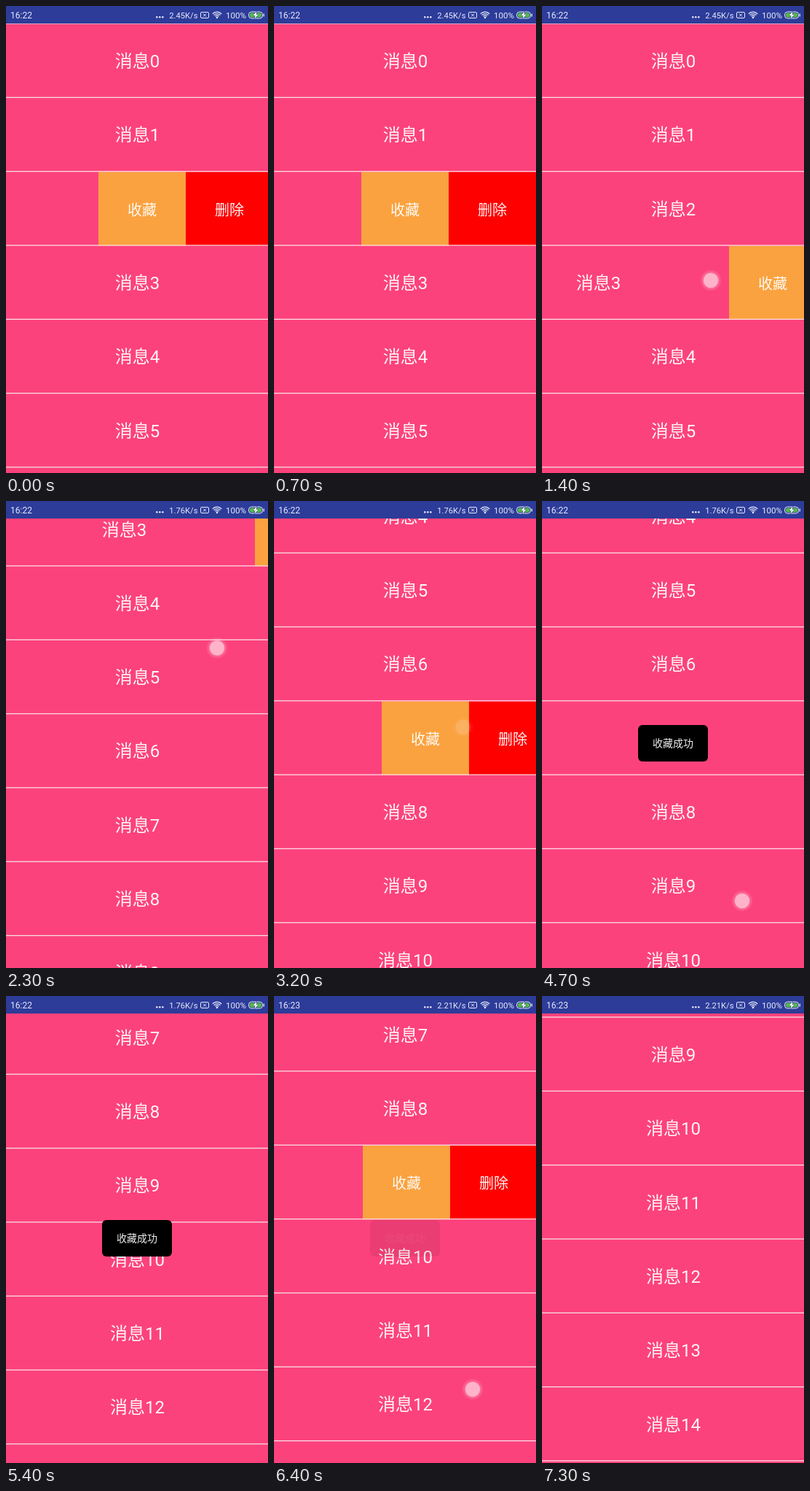
Write an HTML page with a canvas that moves like this. It is 360 by 640 pixels and loops after 7400 ms.

```html
<!DOCTYPE html>
<html lang="zh-CN">
<head>
<meta charset="utf-8">
<title>消息</title>
<style>
  html, body { margin: 0; width: 100%; height: 100%; overflow: hidden; background: #fc427c; }
  canvas { display: block; width: 360px; height: 640px; }
</style>
</head>
<body>
<canvas id="stage" width="360" height="640"></canvas>
<script>
const ctx = document.getElementById('stage').getContext('2d');
const LOOP = 7400, STEP = 100;
const BAR = 24, PITCH = 101.33, BUTTON = 120, DRAG = 103;
const FONT = 'Roboto, "Noto Sans CJK SC", "Noto Sans CJK", sans-serif';
const PINK = '#fc427c', ORANGE = '#faa23f', RED = '#fe0000', LINE = '#f8dce6';
const NAVY = '#2d3c99', INK = '#e6e9fa', WHITE = 'rgba(255,255,255,.94)';

// A row is dragged until release, springs open, and shuts again at close.
const swipes = [
  { row: 2, release: -252, close: 900, x: 240, y: 275 },
  { row: 3, release: 1400, close: 2070, x: 232, y: 376 },
  { row: 7, release: 3036, close: 4000, x: 260, y: 310 },
  { row: 9, release: 6100, close: 6500, x: 245, y: 256 }
];
// The finger lands at x, y and the list follows it, gliding on after release.
const flicks = [
  { start: 2010, span: 800, distance: 459.5, x: 290, y: 542, release: 2320 },
  { start: 4800, span: 800, distance: 272.2, x: 275, y: 548, release: 5050 },
  { start: 6500, span: 600, distance: 175.3, x: 273, y: 539, release: 7060 }
];
const tap = { press: 3820, release: 3940, x: 185, y: 325 };

const progress = (t, start, span) => Math.max(0, Math.min(1, (t - start) / span));
const easeOut = p => 1 - (1 - p) ** 3;

const dragged = (swipe, t) => DRAG * progress(t, swipe.release - 300, 300);
const flicked = (flick, t) => flick.distance * easeOut(progress(t, flick.start, flick.span));

function rowOffset(row, t) {
  const swipe = swipes.find(s => s.row === row);
  if (!swipe) return 0;
  const opened = dragged(swipe, t) +
    (2 * BUTTON - DRAG) * easeOut(progress(t, swipe.release, 400));
  return opened * (1 - easeOut(progress(t, swipe.close, 400)));
}

function rect(x, y, w, h, color) {
  ctx.fillStyle = color;
  ctx.fillRect(x, y, w, h);
}

function pill(x, y, w, h, r, color) {
  ctx.fillStyle = color;
  ctx.beginPath();
  ctx.roundRect(x, y, w, h, r);
  ctx.fill();
}

function disc(x, y, r, color) {
  ctx.fillStyle = color;
  ctx.beginPath();
  ctx.arc(x, y, r, 0, Math.PI * 2);
  ctx.fill();
}

function text(str, x, baseline, size, align = 'center', color = WHITE) {
  ctx.font = `${size}px ${FONT}`;
  ctx.textAlign = align;
  ctx.fillStyle = color;
  ctx.fillText(str, x, baseline);
}

function drawRow(i, scroll, t) {
  const top = BAR + 0.67 + i * PITCH - scroll;
  const edge = Math.round(360 - rowOffset(i, t));
  text('消息' + i, edge - 179.5, top + 59.3, 24);
  if (edge < 360) {
    [['收藏', ORANGE], ['删除', RED]].forEach(([label, color], n) => {
      const x = edge + n * BUTTON;
      rect(x, top, BUTTON, PITCH, color);
      text(label, x + BUTTON / 2, top + 59.4, 20);
    });
  }
  rect(0, top - 1.3, 360, 1.3, LINE);
}

function drawList(t) {
  const scroll = flicks.reduce((sum, flick) => sum + flicked(flick, t), 0);
  const first = Math.floor(scroll / PITCH);
  for (let i = first; i < first + 8; i++) drawRow(i, scroll, t);
}

function drawToast(t) {
  ctx.globalAlpha = progress(t, 4000, 200) * (1 - progress(t, 6000, 430));
  pill(132, 307, 96, 50, 6, '#000');
  text('收藏成功', 180, 337.3, 14);
  ctx.globalAlpha = 1;
}

function drawTouch(x, y, press, release, t) {
  ctx.globalAlpha = progress(t, press, 100) * (1 - progress(t, release, 220));
  disc(x, y, 14, 'rgba(255,255,255,.11)');
  disc(x, y, 12, 'rgba(255,255,255,.1)');
  disc(x, y, 10.3, 'rgba(255,255,255,.5)');
  ctx.globalAlpha = 1;
}

function drawTouches(t) {
  for (const s of swipes) {
    drawTouch(s.x + DRAG - dragged(s, t), s.y, s.release - 400, s.release, t);
  }
  for (const f of flicks) {
    const y = f.y - flicked(f, Math.min(t, f.release));
    drawTouch(f.x, y, f.start - 220, f.release, t);
  }
  drawTouch(tap.x, tap.y, tap.press, tap.release, t);
}

function drawStatusBar(t) {
  const speed = t < 1800 ? '1.76' && '2.45' : t < 5700 ? '1.76' : '2.21';
  rect(0, 0, 360, BAR, NAVY);
  text(t < 5500 ? '16:22' : '16:23', 6, 17, 12, 'left', INK);
  for (let i = 0; i < 3; i++) disc(207.3 + i * 4, 15.2, 1.3, INK);
  text(speed + 'K/s', 263.5, 17, 11.2, 'right', INK);
  text('100%', 302, 17, 11.6, 'left', INK);
  drawSim();
  drawWifi();
  drawBattery();
}

function drawSim() {
  ctx.strokeStyle = INK;
  ctx.lineWidth = 1;
  ctx.beginPath();
  ctx.roundRect(267.5, 8.5, 11, 8, 1.5);
  ctx.moveTo(271, 10.5); ctx.lineTo(275, 14.5);
  ctx.moveTo(275, 10.5); ctx.lineTo(271, 14.5);
  ctx.stroke();
}

function drawWifi() {
  ctx.lineWidth = 1.3;
  for (let ring = 1; ring <= 3; ring++) {
    ctx.beginPath();
    ctx.arc(290, 16.4, 0.8 + ring * 2.5, -Math.PI * 0.77, -Math.PI * 0.23);
    ctx.stroke();
  }
  disc(290, 15.8, 1.4, INK);
}

function drawBattery() {
  ctx.lineWidth = 1;
  ctx.beginPath();
  ctx.roundRect(333.5, 8, 19, 9, 4);
  ctx.stroke();
  pill(335, 9.5, 16, 6, 2.5, '#55bd45');
  rect(353.6, 10.5, 1.3, 4, INK);
  ctx.fillStyle = '#fff';
  ctx.strokeStyle = NAVY;
  const bolt = new Path2D('M344.5 7.5L339.5 13H342.5L341.5 17.5L346.5 11.8H343.5Z');
  ctx.stroke(bolt);
  ctx.fill(bolt);
}

function frame() {
  const t = Math.floor((performance.now() % LOOP) / STEP) * STEP;
  rect(0, 0, 360, 640, PINK);
  drawList(t);
  drawStatusBar(t);
  drawToast(t);
  drawTouches(t);
  requestAnimationFrame(frame);
}
frame();
</script>
</body>
</html>
```
